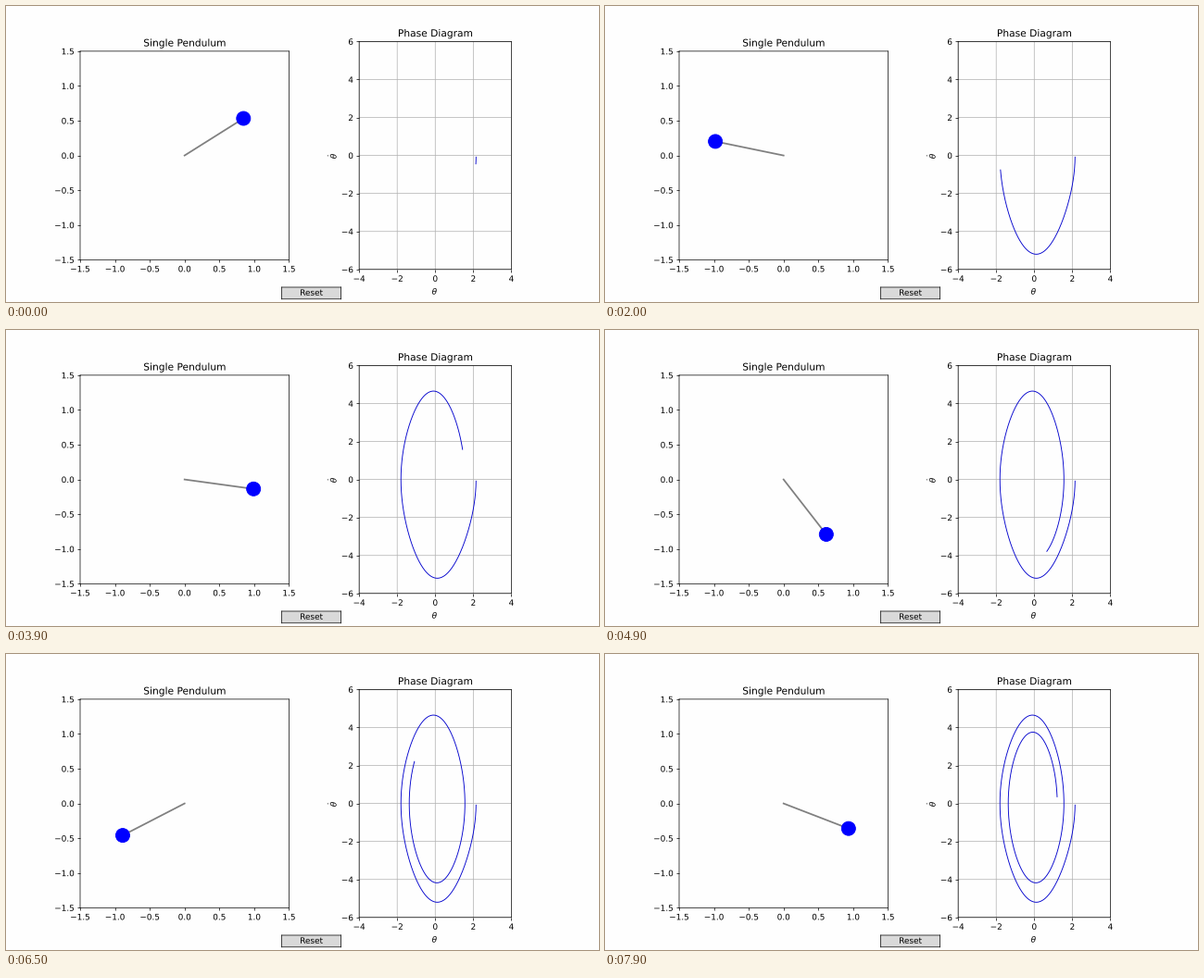
Animation, 640 px wide and 320 px high, one loop 8 s. Source, as a matplotlib script:

```python
import numpy as np
import matplotlib.pyplot as plt
from matplotlib.animation import FuncAnimation
from matplotlib.patches import Circle
from matplotlib.patheffects import Normal
from matplotlib.text import Text

FRAMES, INTERVAL = 80, 100
G, DAMPING, THETA0 = 9.81, 0.2, 2.145
DT = 0.001
FIRST, LEAD, STRIDE = 10, 54, 60  # integration steps: trace start, first pose, per frame
BG = "#fefefe"


def deriv(s):
    theta, omega = s
    return np.array([omega, -G * np.sin(theta) - DAMPING * omega])


def simulate(steps):
    """Damped pendulum released from rest, integrated with RK4."""
    out = np.empty((steps + 1, 2))
    out[0] = THETA0, 0.0
    for i in range(steps):
        s = out[i]
        k1 = deriv(s)
        k2 = deriv(s + DT / 2 * k1)
        k3 = deriv(s + DT / 2 * k2)
        k4 = deriv(s + DT * k3)
        out[i + 1] = s + DT / 6 * (k1 + 2 * k2 + 2 * k3 + k4)
    return out


states = simulate(LEAD + STRIDE * (FRAMES - 1))

# Keep lines and text at their exact subpixel positions.
plt.rcParams.update({"font.family": "DejaVu Sans", "path.snap": False,
                     "text.hinting": "none", "axes.labelpad": 3.5})
fig, (ax, phase) = plt.subplots(1, 2, figsize=(10, 5), dpi=64, facecolor=BG)

ax.set(xlim=(-1.5, 1.5), ylim=(-1.5, 1.5), aspect="equal", facecolor=BG,
       xticks=np.arange(-1.5, 1.6, 0.5), yticks=np.arange(-1.5, 1.6, 0.5),
       title="Single Pendulum")
rod, = ax.plot([], [], color="gray", lw=2)
bob = ax.add_patch(Circle((0, 0), 0.1, color="blue", zorder=3))

phase.set(xlim=(-4, 4), ylim=(-6, 6), aspect="equal", facecolor=BG,
          xticks=range(-4, 5, 2), yticks=range(-6, 7, 2),
          xlabel=r"$\theta$", ylabel=r"$\dot{\theta}$", title="Phase Diagram")
phase.grid(True)
trace, = phase.plot([], [], color="mediumblue", lw=1)

button = fig.add_axes([0.465, 0.01, 0.1, 0.04], facecolor="0.85")
button.set(xticks=[], yticks=[])
button.text(0.5, 0.5, "Reset", ha="center", va="center", transform=button.transAxes)

# A path effect draws the glyphs as outlines instead of pixel-aligned bitmaps.
for text in fig.findobj(Text):
    text.set_path_effects([Normal()])


def update(n):
    last = LEAD + STRIDE * n
    theta = states[last, 0]
    x, y = np.sin(theta), -np.cos(theta)
    rod.set_data([0, x], [0, y])
    bob.center = x, y
    trace.set_data(*states[FIRST:last + 1].T)
    return rod, bob, trace


anim = FuncAnimation(fig, update, frames=FRAMES, interval=INTERVAL,
                     repeat=True, repeat_delay=0)
plt.show()
```
